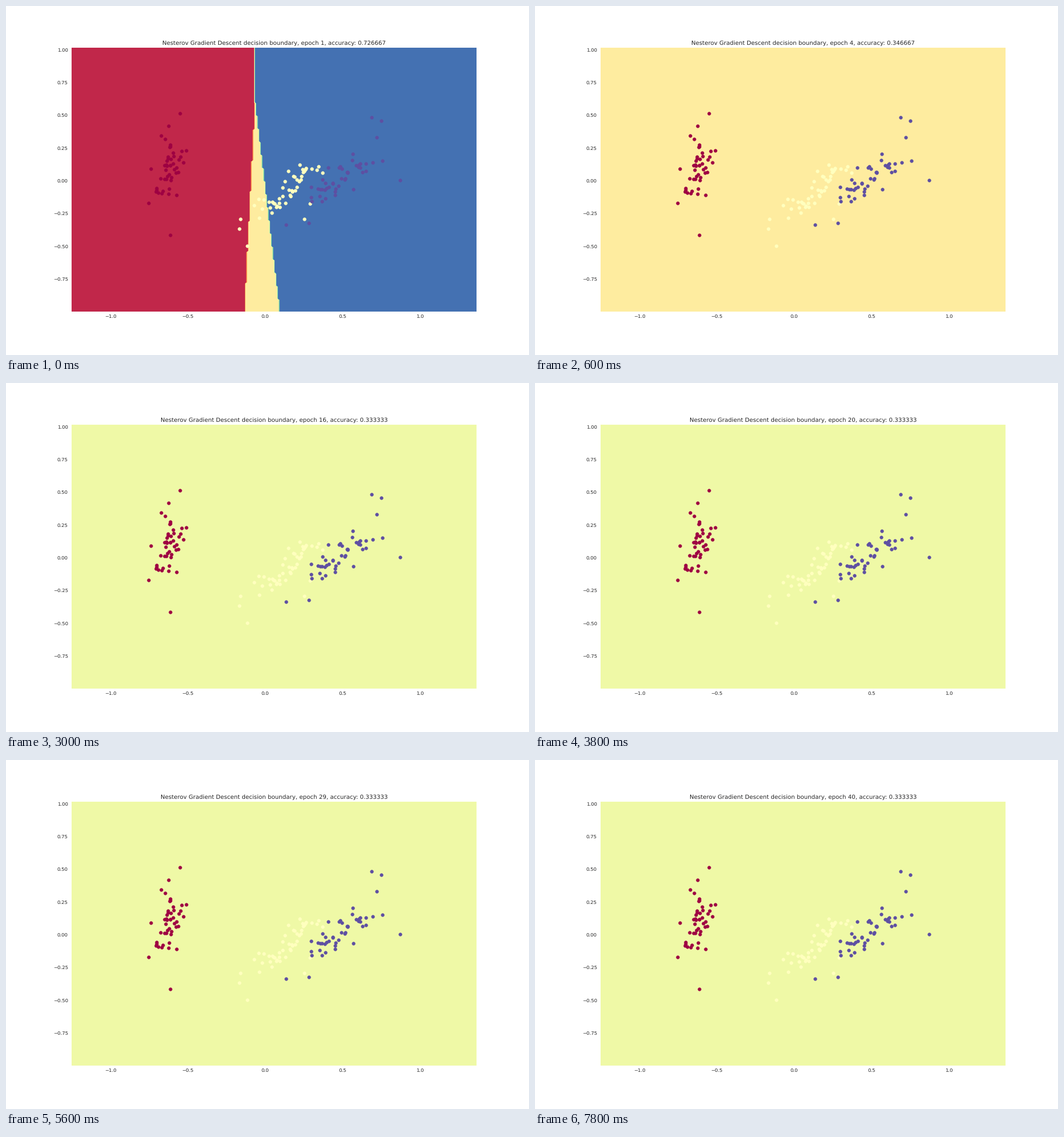
These frames come from a looping animation (917 by 611 pixels, 8 s). A matplotlib script:

```python
import matplotlib.pyplot as plt
import numpy as np
from matplotlib.animation import FuncAnimation

W, H, DPI = 917, 611, 64
PT = 61.13 / DPI            # point scale: the figure is 15 inches wide
INK = "#262626"
LEFT, RIGHT, TOP, BOTTOM = 0.125 * W, 0.9 * W, 0.12 * H, 0.875 * H
CMAP = plt.get_cmap("Spectral")

plt.rcParams["font.family"] = "DejaVu Sans"
plt.rcParams["text.hinting"] = "none"

rng = np.random.default_rng(4)


def to_x(px):
    return (np.asarray(px) - 454.3) / 271.3


def to_y(py):
    return (307 - np.asarray(py)) / 229.3


def cloud(n, start, end, spread, outliers):
    """Points scattered evenly about a line, plus a few outliers."""
    t = (np.arange(n)[:, None] + 0.5) / n
    line = np.array(start) + t * (np.array(end) - start)
    noise = np.clip(rng.normal(size=(n, 2)), -1.8, 1.8) * spread
    return np.vstack([line + noise, outliers])


CLOUDS = [
    cloud(42, (280, 330), (299, 240), (11, 7),
          [(305, 188), (285, 210), (272, 227), (254, 285), (250, 345),
           (288, 401)]),
    cloud(43, (452, 360), (534, 280), (9, 12),
          [(423, 420), (409, 390), (411, 373), (435, 349), (555, 292),
           (523, 373), (533, 346)]),
    cloud(42, (538, 330), (626, 274), (10, 14),
          [(491, 383), (531, 380), (691, 305), (641, 195), (658, 201),
           (650, 230), (660, 271)]),
]

# Class borders per epoch: left border top/bottom, right border top/bottom
BORDERS = [
    (442, 418.6, 426.3, 480.7),
    (350, 336, 462, 502),
    (262.7, 250.3, 320.9, 356.8),
]
HITS = [109, 109, 129, 52]  # correct samples out of 150, then 50

fig = plt.figure(figsize=(W / DPI, H / DPI), dpi=DPI, facecolor="white")
ax = fig.add_axes([0.125, 0.125, 0.775, 0.755])
for spine in ax.spines.values():
    spine.set_visible(False)
ax.tick_params(length=0, pad=7 * PT, labelsize=10 * PT, labelcolor=INK)

cols = np.linspace(LEFT, RIGHT, 263)
rows = np.linspace(TOP, BOTTOM, 202)


def region_map(l_top, l_bottom, r_top, r_bottom):
    t = np.linspace(0, 1, len(rows))
    left = l_top + (l_bottom - l_top) * t
    right = r_top + (r_bottom - r_top) * t
    cut = left > right
    left[cut] = right[cut] = left[~cut].max()
    z = (cols >= left[:, None]).astype(float) + (cols >= right[:, None])
    return ax.contourf(to_x(cols), to_y(rows), z, cmap=CMAP)


regions = [region_map(*b) for b in BORDERS]

for k, points in enumerate(CLOUDS):
    px, py = points.T
    ax.scatter(to_x(px), to_y(py), s=(7 * PT) ** 2, color=CMAP(k / 2),
               linewidths=0.3 * PT)

ax.set_xlim(to_x(LEFT), to_x(RIGHT))
ax.set_ylim(to_y(BOTTOM), to_y(TOP))
ax.set_xticks(np.arange(-1, 1.01, 0.5))
ax.set_yticks(np.arange(-0.75, 1.01, 0.25))
title = ax.set_title("", fontsize=12.08 * PT, color=INK, pad=6 * PT)


def update(i):
    for k, region in enumerate(regions):
        region.set_visible(k == i)
    ax.set_facecolor(CMAP(0.4375 if i <= 3 else 0.5625))
    acc = (HITS[i] if i < len(HITS) else 50) / 150
    title.set_text("Nesterov Gradient Descent decision boundary, "
                   f"epoch {i + 1}, accuracy: {acc:.6f}")
    return [ax]


anim = FuncAnimation(fig, update, frames=40, interval=200, repeat=True,
                     repeat_delay=0, blit=False)
plt.show()
```
